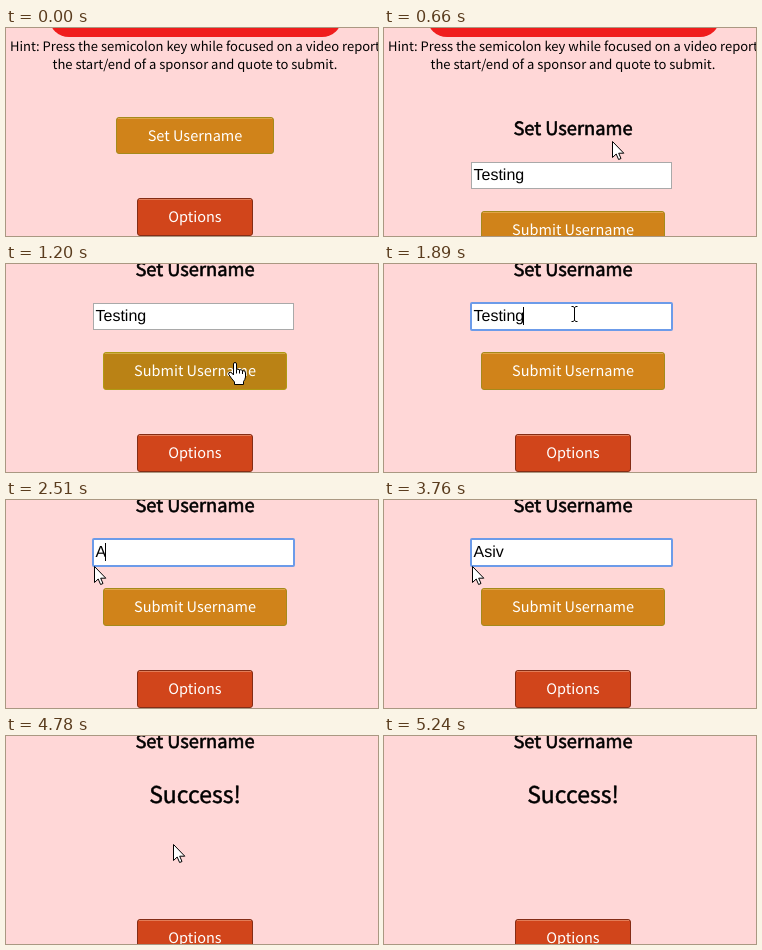
Animation of 372 by 208 pixels, one loop 5800 ms. Source, as an HTML page:

```html
<!DOCTYPE html>
<html lang="en">
<head>
<meta charset="utf-8">
<title>Set username</title>
<style>
  html, body { margin: 0; width: 100%; height: 100%; overflow: hidden; background: #ffd7d7; }
  svg { display: block; width: 372px; height: 208px; background: #ffd7d7; }
  text { font-family: "Noto Sans CJK JP", "Noto Sans CJK SC", "Noto Sans CJK", "Open Sans", sans-serif;
         text-rendering: geometricPrecision; white-space: pre; }
  .mid { text-anchor: middle; }
  .hint { font-size: 13px; }
  .head { font-size: 18.3px; stroke: #000; stroke-width: .6px; }
  .done { font-size: 23px; stroke: #000; stroke-width: .45px; }
  .btn text { font-size: 14.5px; fill: #fff; }
  .btn .face { fill: #d0831a; stroke: #a58a1c; }
  .btn .shine { stroke: #e0a548; }
  .btn.hover .face { fill: #ba8215; stroke: #b09a14; }
  .btn.hover .shine { stroke: #cfaa45; }
  .btn.press .face { fill: #a97410; }
  .btn.red .face { fill: #d1451b; stroke: #842d16; }
  .btn.red .shine { stroke: #e27d58; }
  #field text { font: 16px "Liberation Sans", Arial, sans-serif; }
  #cursor path { fill: #fff; stroke: #000; stroke-linejoin: round; }
  #cursor #ibeam { fill: none; }
</style>
</head>
<body>
<svg viewBox="0 0 372 208">
  <g id="page">
    <rect x="43" y="-60" width="293" height="69" rx="20" fill="#f01d1d"/>
    <text class="mid hint" x="189" y="23">Hint: Press the semicolon key while focused on a video report</text>
    <text class="mid hint" x="189" y="41">the start/end of a sponsor and quote to submit.</text>
    <text id="head" class="mid head" x="189" y="107">Set Username</text>
    <g id="field">
      <rect id="box" fill="#fff"/>
      <rect id="mark" x="89.5" y="138" height="19" fill="#3390ff"/>
      <text id="value" x="89.5" y="152"></text>
      <rect id="caret" y="138" width="1" height="18"/>
    </g>
    <text id="done" class="mid done" x="189" y="161.5">Success!</text>
  </g>
  <g id="cursor">
    <path id="arrow" d="M.5.5V16.5L4.2 13 6.6 18.5 9 17.5 6.7 12.2H11.8Z"/>
    <path id="hand" d="M-1.5 13V2Q-1.5.5 0 .5T1.5 2V7.5Q3 6.5 4.5 8 6 7 7.5 8.7 10.5 8 10.5 11V15Q10 18 8.5 19.5V22.5H-.5V20Q-4 16-6.2 12.5-6.8 10.3-4.8 10.2-3 10.5-1.5 13ZM1.5 7.5V11.5M4.5 8V11.5M7.5 8.7V12"/>
    <path id="ibeam" d="M-2.5-7.5H-1L.5-6.5 2-7.5H3.5M.5-6.5V6.5M-2.5 7.5H-1L.5 6.5 2 7.5H3.5"/>
  </g>
</svg>
<script>
const LOOP = 5800;
const OPEN = 660, FOCUS = 1890, SELECT = 2050, PRESS = 4610, DONE = 4780, GONE = 5240;
const $ = id => document.getElementById(id);
const set = (node, attrs) => { for (const k in attrs) node.setAttribute(k, attrs[k]); };
const show = (node, on) => { node.style.display = on ? '' : 'none'; };

// Last row of a [time, ...values] table that has begun
const at = (rows, t) => rows.reduce((found, row) => row[0] <= t ? row : found);

// Evenly timed pointer stops from one place to another
const glide = (t0, t1, n, from, to, ease = p => p) =>
  Array.from({ length: n }, (_, i) => {
    const p = i / (n - 1), q = ease(p);
    return [t0 + (t1 - t0) * p, ...from.map((a, k) => Math.round(a + (to[k] - a) * q))];
  });

const easeOut = p => 1 - (1 - p) ** 2;

const pointer = [
  [0, -50, -50],
  ...glide(70, 590, 8, [357, 195], [228, 113], easeOut),
  [1200, 229, 98],
  ...glide(1270, 1510, 4, [224, 86], [196, 48]),
  [1740, 196, 49],
  ...glide(1890, 2050, 3, [190, 50], [92, 52]),
  [2350, 71, 60], [2430, 78, 68], [2510, 88, 66],
  [3830, 92, 64], [4150, 31, 72], [4230, 98, 92],
  ...glide(4310, 4460, 3, [163, 104], [167, 108]),
  ...glide(4930, 5160, 4, [200, 99], [345, 149]),
];
const scroll = [[0, 0], [970, 10], [1050, 34], [1120, 68], [1200, 95]];
const typed = [[0, 'Testing'], [2510, 'A'], [2980, 'As'], [3130, 'Asi'], [3210, 'Asiv']];
const blink = [[0, true], [3760, false], [4310, true]];

function button(label, w, h, y, kind = '') {
  const x = 189 - w / 2;
  const g = document.createElementNS('http://www.w3.org/2000/svg', 'g');
  g.innerHTML =
    `<rect class="face" x="${x + .5}" y=".5" width="${w - 1}" height="${h - 1}" rx="2.5"/>` +
    `<path class="shine" d="M${x + 2} 1.5H${x + w - 2}"/>` +
    `<text class="mid" x="189" y="24">${label}</text>`;
  $('page').append(g);
  const b = {
    x, y, w, h,
    paint(state = '') { g.setAttribute('class', `btn ${kind} ${state}`); },
    move(top) { b.y = top; g.setAttribute('transform', `translate(0 ${top})`); },
    show(on) { show(g, on); }
  };
  b.paint();
  b.move(y);
  return b;
}

const opener = button('Set Username', 158, 37, 89);
const submit = button('Submit Username', 184, 38, 183);
const options = button('Options', 116, 38, 170, 'red');
const field = { x: 87, y: 134, w: 201, h: 27 };
const inside = (r, x, y) => x >= r.x && x < r.x + r.w && y >= r.y && y < r.y + r.h;

function drawField(t) {
  const focused = t >= FOCUS && t < PRESS;
  const selected = t >= SELECT && t < typed[1][0];
  set($('box'), focused
    ? { x: 87, y: 134, width: 201, height: 27, rx: 1, stroke: '#6c9be9', 'stroke-width': 2 }
    : { x: 87.5, y: 134.5, width: 200, height: 26, rx: 0, stroke: '#a9a9a9', 'stroke-width': 1 });
  const value = $('value'), text = at(typed, t)[1];
  if (value.textContent !== text) value.textContent = text;
  set(value, { fill: selected ? '#fff' : '#000' });
  const width = value.getComputedTextLength();
  set($('mark'), { width });
  set($('caret'), { x: Math.floor(89.5 + width - .5) });
  show($('mark'), selected);
  show($('caret'), focused && !selected && at(blink, t)[1]);
}

function draw(t) {
  const form = t >= OPEN && t < DONE, done = t >= DONE;
  const top = at(scroll, t)[1];
  const [, x, y] = at(pointer, t);
  set($('page'), { transform: `translate(0 ${-top})` });

  opener.show(t < OPEN);
  submit.show(form);
  show($('head'), form || done);
  show($('field'), form);
  show($('done'), done);
  options.move(done ? 278 : form ? 265 : 170);
  if (form) drawField(t);

  const over = r => inside(r, x, y + top);
  const onOpener = t < OPEN && over(opener), onSubmit = form && over(submit);
  opener.paint(onOpener ? 'hover' : '');
  submit.paint(onSubmit ? (t >= PRESS ? 'hover press' : 'hover') : '');

  const dragging = t >= FOCUS && t < typed[1][0];
  const shape = onOpener || onSubmit || over(options) ? 'hand'
    : dragging || (form && over(field)) ? 'ibeam' : 'arrow';
  for (const id of ['arrow', 'hand', 'ibeam']) show($(id), id === shape);
  set($('cursor'), { transform: `translate(${x} ${y})` });
  show($('cursor'), t < GONE);
}

const start = performance.now();
function tick() {
  draw((performance.now() - start) % LOOP);
  requestAnimationFrame(tick);
}
tick();
</script>
</body>
</html>
```
